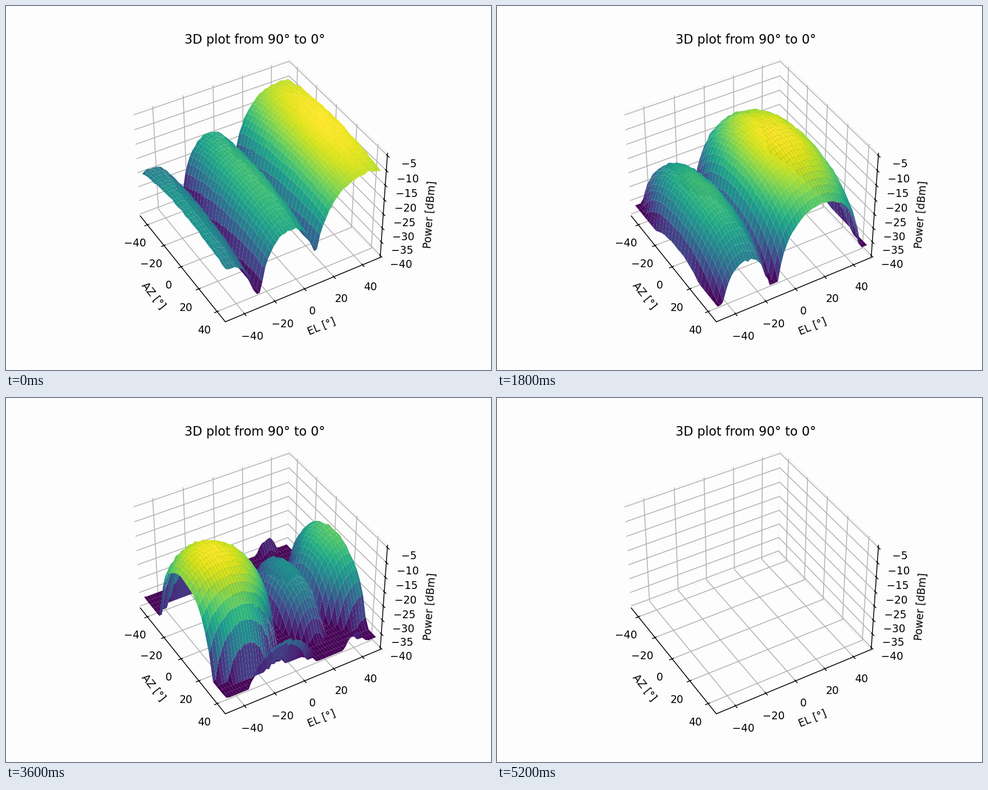
Animation of 864 by 648 pixels, one loop 6000 ms. Source, as a matplotlib script:

```python
import numpy as np
import matplotlib.pyplot as plt
from matplotlib.animation import FuncAnimation

STEPS, FRAMES = 26, 30
FLOOR = -36.5
PAPER = "#fdfdfd"

AZ, EL = np.meshgrid(np.linspace(-46.8, 46.8, 27),
                     np.linspace(-50.4, 50.4, 57))
ROW_SIGN = np.where(np.arange(57) % 2, 1, -1)[:, None]

# Beams: peak [dBm], elevation offset from the main beam, width to the null.
BEAMS = [(-6.8, 0, 35), (-16, -49, 22), (-21, -89, 23),
         (-21.5, 49, 17), (-14.5, 80, 24)]


def lobe(az, el, width_az, width_el, square):
    """Level in dB below the peak; square=1 is a product of two cuts."""
    a = np.minimum((az / width_az) ** 2, 1)
    b = np.minimum((el / width_el) ** 2, 1)
    return 30 * np.log10(np.maximum(1 - a - b + square * a * b, 1e-3))


def pattern(k, az, el):
    """The beams sweep down in elevation while they narrow in azimuth."""
    sweep = -4 + 46 * np.cos(np.pi * k / STEPS)
    width = 37 + 70 * np.exp(-(k / 9.5) ** 2)
    square = np.exp(-(k / 12) ** 4)
    levels = []
    for peak, offset, w in BEAMS:
        d_az, d_el = az - 2, el - sweep - offset
        levels.append(peak + lobe(d_az, d_el, width, w, square))
        # Weaker cross lobes on both sides in azimuth.
        for side in (-1, 1):
            levels.append(0.5 * peak - 20 + lobe(
                az - side * (width + 12), d_el - 17, 15, 0.85 * w, 0))
    return np.max(levels, axis=0)


def power(k):
    rng = np.random.default_rng(100 + k)
    tooth = 1 if k % 3 == 2 else 0.12
    az = AZ + 1.2 * tooth * ROW_SIGN
    el = EL + 0.045 * max(0, 1 - k / 9) * AZ
    z = pattern(k, az, el)
    z += rng.normal(0, 0.2, z.shape) + 0.35 * tooth * ROW_SIGN
    return np.maximum(z, FLOOR)


fig = plt.figure(figsize=(6.4, 4.8), dpi=135, facecolor=PAPER)
ax = fig.add_subplot(projection="3d", facecolor=PAPER)
ax.view_init(elev=40, azim=-30.5)
ax.set_title("3D plot from 90° to 0°")
ax.set(xlabel="AZ [°]", ylabel="EL [°]", zlabel="Power [dBm]")
ax.set_xlim(-48.75, 48.75)
ax.set_ylim(-52.5, 52.5)
ax.set_zlim(-40.73, -4.27)
ax.set_xticks(range(-40, 41, 20))
ax.set_yticks(range(-40, 41, 20))
ax.set_zticks(range(-40, -4, 5))
for axis in (ax.xaxis, ax.yaxis, ax.zaxis):
    axis.pane.fill = False


def clear():
    for surf in list(ax.collections):
        surf.remove()
    return []


def update(k):
    clear()
    if k < STEPS:
        ax.plot_surface(AZ, EL, power(k), cmap="viridis",
                        rstride=1, cstride=1)
    return []


anim = FuncAnimation(fig, update, frames=FRAMES, init_func=clear,
                     interval=200, repeat=True, repeat_delay=0, blit=False)
plt.show()
```
